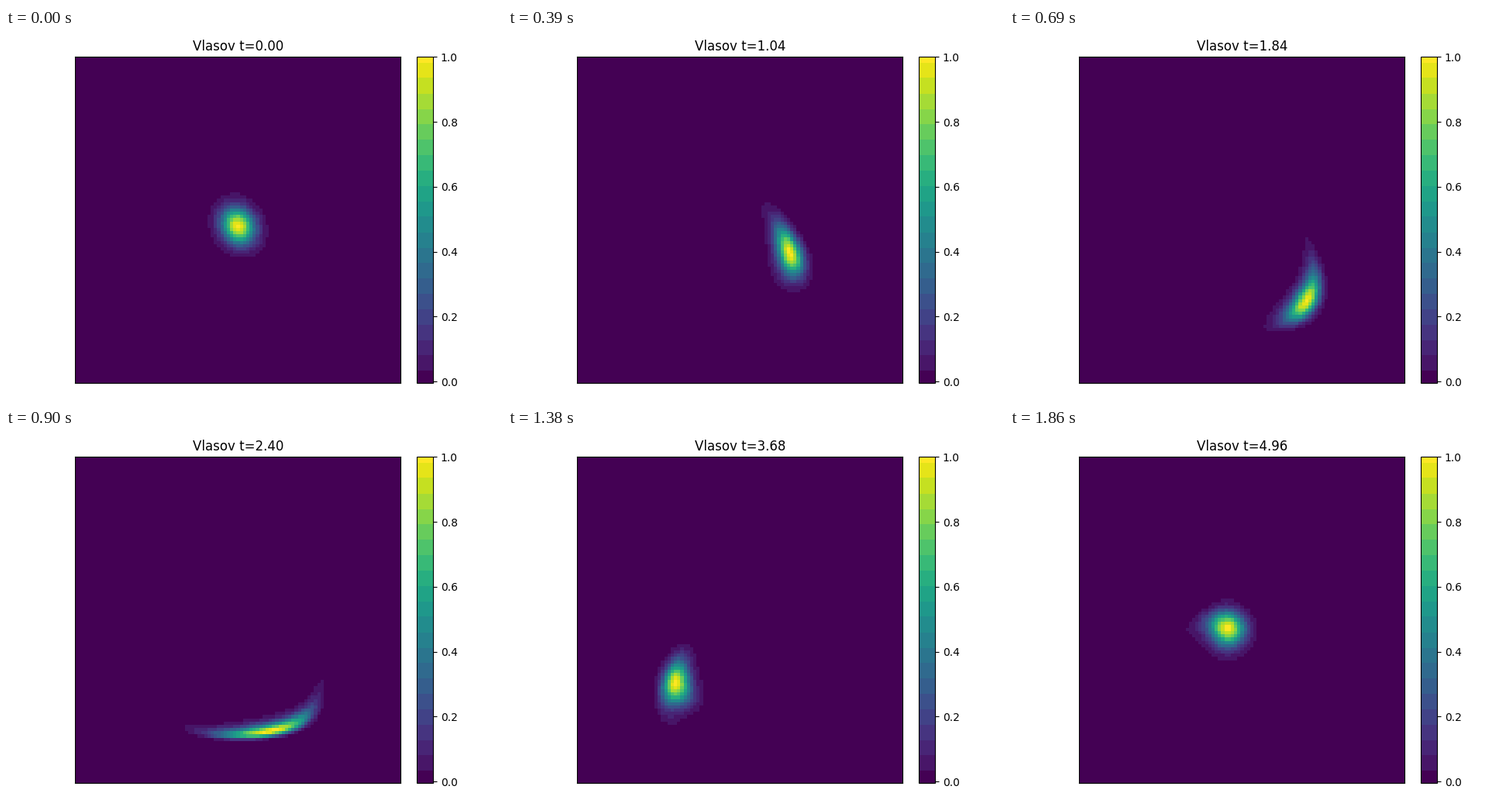
Recreate the animation shown at these times as a matplotlib script. Size 640x480 px, loop 1.89 s.

```python
import numpy as np
import matplotlib.pyplot as plt
from matplotlib.animation import FuncAnimation
from matplotlib.colors import ListedColormap

W, H, DPI = 640, 480, 100
FRAMES, INTERVAL = 63, 30
DT, SUBSTEPS = 0.08, 4
VMIN, VMAX = -0.0035, 1.0

plt.rcParams["font.family"] = "DejaVu Sans"


def force(q):
    """Cubic potential well closed by a steep wall."""
    q = np.clip(q, -3.0, 4.3)
    return 1.57 - 0.314 * q**2 - 3.24 * np.exp(5 * (q - 3.6))


def step_back(q, p):
    """Trace the characteristics one frame back in time (leapfrog)."""
    h = -DT / SUBSTEPS
    for _ in range(SUBSTEPS):
        p = p + force(q) * h / 2
        q = q + p * h
        p = p + force(q) * h / 2
    return q, p


def initial(q, p):
    a, b, rho = p / 0.355, (q - 0.19) / 0.385, 0.15
    return np.exp(-(a * a - 2 * rho * a * b + b * b) / (2 * (1 - rho**2)))


def solve():
    grid = np.linspace(-5, 5, 101)
    p, q = np.meshgrid(grid, grid)
    states = []
    for _ in range(FRAMES):
        f = initial(q, p)
        states.append(f / f.max())
        q, p = step_back(q, p)
    return states


def banded_viridis():
    edges = np.linspace(0.032, 0.983, 21)
    tones = np.concatenate([[0], (edges[1:] + edges[:-1]) / 2, [1]])
    values = np.linspace(VMIN, VMAX, 512)
    return ListedColormap(plt.get_cmap("viridis")(tones[np.searchsorted(edges, values)]))


def add_axes(x, y, w, h):
    return fig.add_axes([x / W, 1 - (y + h) / H, w / W, h / H])


states = solve()
fig = plt.figure(figsize=(W / DPI, H / DPI), dpi=DPI, facecolor="white")
ax = add_axes(89.2, 37.4, 420.2, 420.2)
cax = add_axes(530.2, 37.4, 21, 420.2)

image = ax.imshow(states[0], cmap=banded_viridis(), vmin=VMIN, vmax=VMAX,
                  interpolation="nearest", aspect="auto")
ax.set_xticks([])
ax.set_yticks([])
title = ax.set_title("Vlasov t=0.00")
fig.colorbar(image, cax=cax, ticks=np.linspace(0, 1, 6), format="%.1f")


def update(i):
    image.set_data(states[i])
    title.set_text(f"Vlasov t={i * DT:.2f}")
    return image, title


anim = FuncAnimation(fig, update, frames=FRAMES, interval=INTERVAL,
                     repeat=True, repeat_delay=0, blit=False)
plt.show()
```
